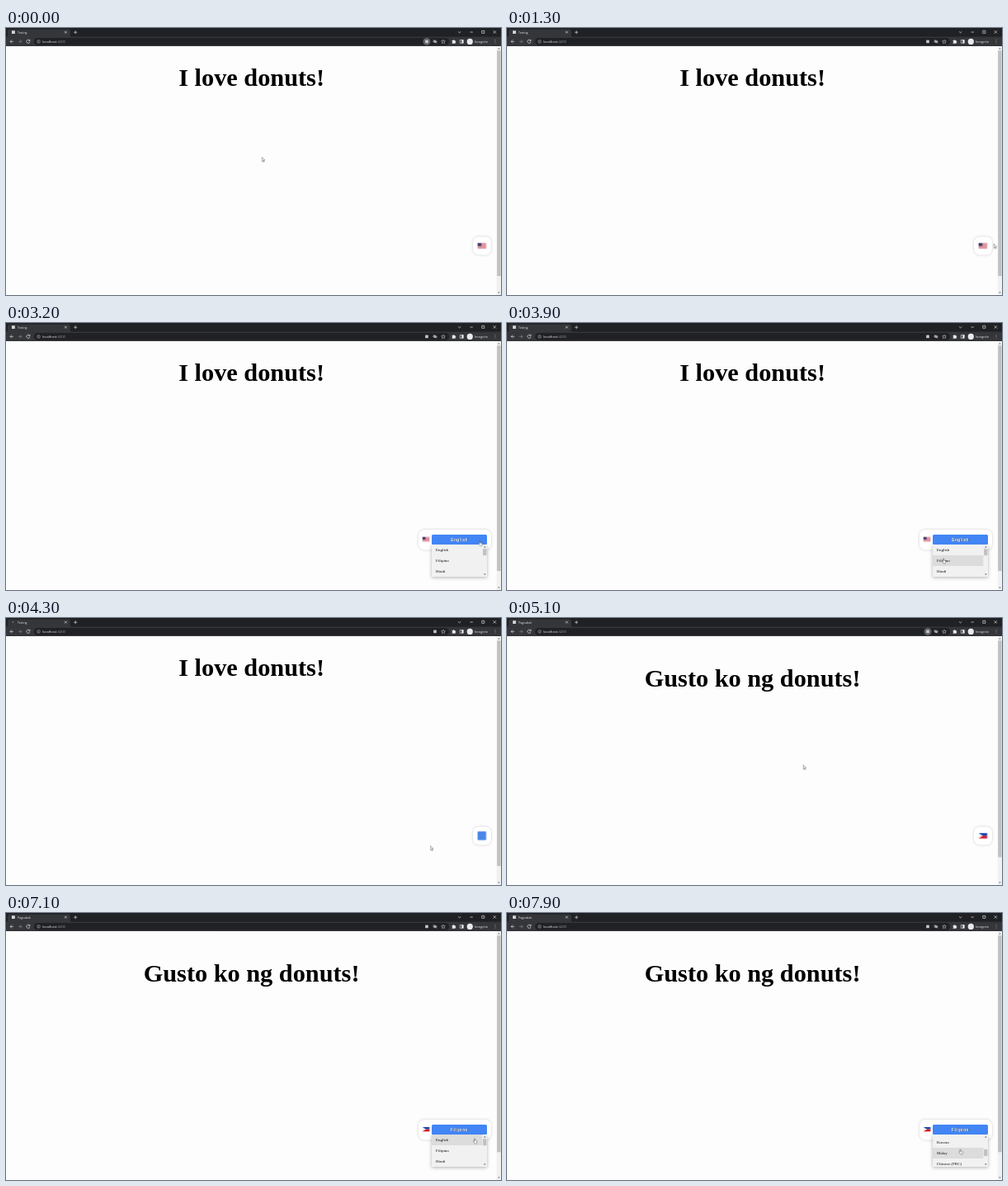
An HTML page for the animation above (8000 ms loop, 600 by 323 pixels).

```html
<!DOCTYPE html>
<html lang="en">
<head>
<meta charset="utf-8">
<title>Language picker</title>
<style>
  html, body { margin: 0; width: 100%; height: 100%; overflow: hidden; background: #fefdfe; }
  svg.stage { display: block; width: 100vw; height: 100vh; }
  text { white-space: pre; }

  .ui { font-family: "Open Sans", "Noto Sans", sans-serif; fill: #e8eaed; }
  .icon { fill: none; stroke: #dadce0; stroke-width: .7; }
  .title { font: bold 30.3px "Liberation Serif", "Times New Roman", serif; text-anchor: middle; }
  .label { font: bold 5px "Liberation Sans", Arial, sans-serif; letter-spacing: .4px; fill: #fff;
           text-anchor: middle; text-shadow: .4px .6px .6px rgba(0,0,0,.75); }
  .rows { font: 5px "Liberation Serif", "Times New Roman", serif; fill: #111; }

  /* Shared 8 s clock: .step holds each value, .move interpolates */
  .step { animation: 8s step-end infinite; }
  .move { animation: 8s ease-in-out infinite; }

  .before { animation-name: before; }
  .after { animation-name: after; }
  .loading { animation-name: loading; }
  .ready { animation-name: ready; }
  .english { animation-name: english; }
  .halo { animation-name: halo; }
  .grip { animation-name: grip; }
  .pill { x: 566px; y: 252.5px; width: 22px; height: 22px; animation-name: pill;
          fill: #fff; filter: drop-shadow(0 .6px 1.4px rgba(0,0,0,.2)); }
  .flag { animation-name: flag; }
  .button { animation-name: button; }
  .list { animation-name: list; filter: drop-shadow(0 1.2px 2px rgba(0,0,0,.3)); }
  .hover { animation-name: hover; }
  .scroll { animation-name: scroll; }
  .thumb { animation-name: thumb; }
  .cursor { animation-name: cursor; }
  .arrow { animation-name: arrow; }
  .hand { animation-name: hand; }

  @keyframes before { 0% { opacity: 1 } 58.75% { opacity: 0 } }
  @keyframes after { 0% { opacity: 0 } 58.75% { opacity: 1 } }
  @keyframes loading { 0% { opacity: 0 } 51.6% { opacity: 1 } 58.75% { opacity: 0 } }
  @keyframes ready { 0% { opacity: 1 } 51.6% { opacity: 0 } 58.75% { opacity: 1 } }
  @keyframes english { 0% { opacity: 1 } 51.6% { opacity: 0 } }
  @keyframes halo {
    0%, 13% { opacity: 1 } 16%, 58.7% { opacity: 0 }
    58.75%, 84% { opacity: 1 } 87%, 100% { opacity: 0 }
  }
  @keyframes grip { 0% { fill: #c1c1c1 } 17.5% { fill: #a8a8a8 } 21.5% { fill: #c1c1c1 } }
  @keyframes pill {
    0%, 30%, 51.3%, 75% { x: 566px; y: 252.5px; width: 22px; height: 22px }
    34%, 51.25%, 78.75%, 100% { x: 500px; y: 250px; width: 88px; height: 24.5px }
  }
  @keyframes flag {
    0%, 30%, 51.3%, 75% { transform: translate(571.6px, 260.2px) }
    34%, 51.25%, 78.75%, 100% { transform: translate(504.8px, 259px) scale(.82) }
  }
  @keyframes button {
    0%, 32%, 51.3%, 76.5% { opacity: 0 }
    36.5%, 51.25%, 79%, 100% { opacity: 1 }
  }
  @keyframes list {
    0% { opacity: 0 } 39.4% { opacity: 1 } 51.25% { opacity: 0 } 84.4% { opacity: 1 }
  }
  @keyframes hover {
    0% { opacity: 0 }
    42% { opacity: 1; transform: none }
    45.6% { opacity: 1; transform: translateY(13px) }
    51.25% { opacity: 0 }
    86.5% { opacity: 1; transform: none }
    91% { opacity: 1; transform: translateY(65px) }
    97.3% { opacity: 1; transform: translateY(78px) }
  }
  @keyframes scroll { 0%, 90% { transform: none } 93%, 100% { transform: translateY(-62.5px) } }
  @keyframes thumb { 0%, 90% { transform: none } 93%, 100% { transform: translateY(12.8px) } }
  @keyframes cursor {
    0%, 1.25% { transform: translate(310.2px, 156.4px) }
    10%, 12.5% { transform: translate(576.5px, 259px) }
    18.5%, 20% { transform: translate(595.5px, 262px) }
    23% { transform: translate(588.5px, 262px) }
    28.2%, 33% { transform: translate(579px, 264.5px) }
    37.5%, 40.2% { transform: translate(574.3px, 263.8px) }
    48%, 51% { transform: translate(529px, 285px) }
    53.75%, 54% { transform: translate(514.5px, 275.7px) }
    60% { transform: translate(360px, 178px) }
    63.75%, 68% { transform: translate(359px, 177.8px) }
    77.5%, 81.5% { transform: translate(571.2px, 268.6px) }
    83.5%, 85% { transform: translate(572px, 264px) }
    88.5%, 95.5% { transform: translate(568px, 273px) }
    98.5%, 100% { transform: translate(549.5px, 286px) }
  }
  @keyframes arrow {
    0% { opacity: 1 } 27% { opacity: 0 } 51.25% { opacity: 1 } 82.3% { opacity: 0 }
  }
  @keyframes hand {
    0% { opacity: 0 } 27% { opacity: 1 } 51.25% { opacity: 0 } 82.3% { opacity: 1 }
  }
</style>
</head>
<body>
<svg class="stage" viewBox="0 0 600 323" preserveAspectRatio="none">
  <rect width="600" height="323" fill="#fefdfe"/>

  <!-- Browser frame -->
  <rect width="600" height="11" fill="#202124"/>
  <rect y="10.6" width="600" height="11.4" fill="#35363a"/>
  <path d="M0 11q2 0 2-2V4q0-2.5 2.5-2.5h71q2.5 0 2.5 2.5v5q0 2 2 2z" fill="#35363a"/>
  <rect x="34" y="12" width="503" height="8.8" rx="4.4" fill="#202124"/>

  <g class="ui" font-size="3.5">
    <g class="step before"><text x="14" y="6.6">Testing</text></g>
    <g class="step after"><text x="14" y="6.6">Pagsubok</text></g>
    <rect class="step ready" x="7" y="3.2" width="3.8" height="3.8" fill="#d5d6d9"/>
    <circle class="step loading" cx="8.4" cy="5" r=".7" fill="#9aa0a6"/>
    <text x="44" y="17.8" font-size="4.15">localhost<tspan fill="#9aa0a6">:4200</tspan></text>
    <text x="568" y="17.5" font-size="3.7">Incognito</text>
  </g>

  <g class="icon">
    <path d="M71 3.7l2.8 2.8m0-2.8l-2.8 2.8M82.2 5.2h4m-2-2v4"/>
    <path d="M548 4.3l1.7 1.6 1.7-1.6M562.5 5h3.4M576.8 3.3h3v3h-3zM590.6 3.2l3.4 3.4m0-3.4l-3.4 3.4"/>
    <path d="M9 16.4H5m2-2l-2 2 2 2"/>
    <path d="M15 16.4h4m-2-2l2 2-2 2" stroke="#85878b"/>
    <path d="M28.6 15a2.1 2.1 0 1 0 .4 1.7M29 13.8v1.8h-1.8"/>
    <g stroke-width=".45"><circle cx="39.5" cy="16.4" r="1.8"/><path d="M39.5 16.1v1.3m0-2.1v.3"/></g>
    <path d="M530 14.1l.7 1.6 1.7.1-1.3 1.1.4 1.7-1.5-.9-1.5.9.4-1.7-1.3-1.1 1.7-.1z" stroke-width=".5"/>
    <path d="M550.3 14.5h4v3.8h-4z"/>
  </g>
  <g fill="#e8eaed">
    <path d="M540.6 15h1.2a.8.8 0 0 1 1.6 0h1.2v1.2a.8.8 0 0 1 0 1.6v1h-4v-1.2a.7.7 0 0 0 0-1.4z"/>
    <path d="M552.3 14.5h2v3.8h-2z"/>
    <circle cx="562.3" cy="16.4" r="3.6"/>
    <circle cx="593" cy="14.7" r=".45"/><circle cx="593" cy="16.4" r=".45"/><circle cx="593" cy="18.1" r=".45"/>
  </g>
  <g class="step ready">
    <circle class="move halo" cx="510" cy="16.4" r="4.5" fill="#5f6368"/>
    <rect x="508.2" y="14.6" width="3.6" height="3.6" fill="#c4c7cb"/>
    <g class="icon" stroke-width=".5">
      <path d="M517.6 16.4q2.4-3 4.8 0-2.4 3-4.8 0zM518 14.2l4 4.3"/><circle cx="520" cy="16.4" r=".6"/>
    </g>
  </g>
  <rect class="step loading" x="518.2" y="14.6" width="3.6" height="3.6" fill="#c4c7cb"/>

  <!-- Page -->
  <rect x="594.7" y="22" width="5.3" height="301" fill="#f1f1f1"/>
  <path d="M596.1 25.6l1.3-1.5 1.3 1.5zM596.1 319.4l1.3 1.5 1.3-1.5z" fill="#666"/>
  <g class="step before">
    <rect class="step grip" x="595.2" y="27.3" width="4.4" height="272.7" fill="#c1c1c1"/>
    <text class="title" x="297.6" y="70">I love donuts!</text>
  </g>
  <g class="step after">
    <rect x="595.2" y="27.3" width="4.4" height="262" fill="#c1c1c1"/>
    <text class="title" x="297.6" y="82.5">Gusto ko ng donuts!</text>
  </g>

  <!-- Language picker -->
  <rect class="move pill" rx="7"/>
  <g class="move flag">
    <g class="step english">
      <rect width="10.4" height="6.5" fill="#f4eeee"/>
      <path d="M0 .25h10.4M0 1.25h10.4M0 2.25h10.4M0 3.25h10.4M0 4.25h10.4M0 5.25h10.4M0 6.25h10.4"
            stroke="#c3283c" stroke-width=".5"/>
      <rect width="4.6" height="3.5" fill="#3c3b6e"/>
    </g>
    <rect class="step loading" y="-2" width="10.4" height="10.4" rx="1" fill="#4a86e8"/>
    <g class="step after">
      <rect width="10.4" height="3.25" fill="#1a45b0"/>
      <rect y="3.25" width="10.4" height="3.25" fill="#d0182c"/>
      <path d="M0 0l5 3.25-5 3.25z" fill="#fff"/>
      <circle cx="1.7" cy="3.25" r=".7" fill="#f8cf3c"/>
    </g>
  </g>

  <g class="step list">
    <svg x="516" y="268" width="67" height="39">
      <rect width="67" height="39" fill="#f1f1f1"/>
      <g class="move scroll">
        <rect class="step hover" width="61.5" height="13" fill="#dcdcdc"/>
        <text class="rows" y="-4.8">
          <tspan x="5" dy="13">English</tspan>
          <tspan x="5" dy="13">Filipino</tspan>
          <tspan x="5" dy="13">Hindi</tspan>
          <tspan x="5" dy="13">Indonesian</tspan>
          <tspan x="5" dy="13">Japanese</tspan>
          <tspan x="5" dy="13">Korean</tspan>
          <tspan x="5" dy="13">Malay</tspan>
          <tspan x="5" dy="13">Chinese (PRC)</tspan>
          <tspan x="5" dy="13">Chinese (Taiwan)</tspan>
          <tspan x="5" dy="13">Thai</tspan>
          <tspan x="5" dy="13">Vietnamese</tspan>
        </text>
      </g>
      <rect x="61.6" width="5.4" height="39" fill="#f1f1f1"/>
      <rect class="move thumb" x="62.1" y="5.2" width="4.4" height="8" fill="#c1c1c1"/>
      <path d="M63 3.4l1.3-1.5 1.3 1.5zM63 35.6l1.3 1.5 1.3-1.5z" fill="#555"/>
    </svg>
  </g>
  <g class="move button">
    <rect x="516" y="256" width="67" height="12" rx="1.6" fill="#4285f4"/>
    <text class="label step before" x="549.6" y="263.7">English</text>
    <text class="label step after" x="549.6" y="263.7">Filipino</text>
  </g>

  <!-- Pointer -->
  <g class="move cursor">
    <g fill="#fff" stroke="#222" stroke-width="1.3" stroke-linejoin="round">
      <g class="step arrow"><path transform="scale(.3125)" d="M0 0v16l3.7-3.5 2.6 6 2.6-1.1-2.6-5.9h5.2z"/></g>
      <g class="step hand">
        <path transform="scale(.3125) translate(-6.5 -.5)"
              d="M5 2a1.5 1.5 0 0 1 3 0v5l6 1.5a2 2 0 0 1 1.5 2V14l-2 5H7L1.5 11.5a1.4 1.4 0 0 1 2-2L5 11z"/>
      </g>
    </g>
  </g>
</svg>
</body>
</html>
```
